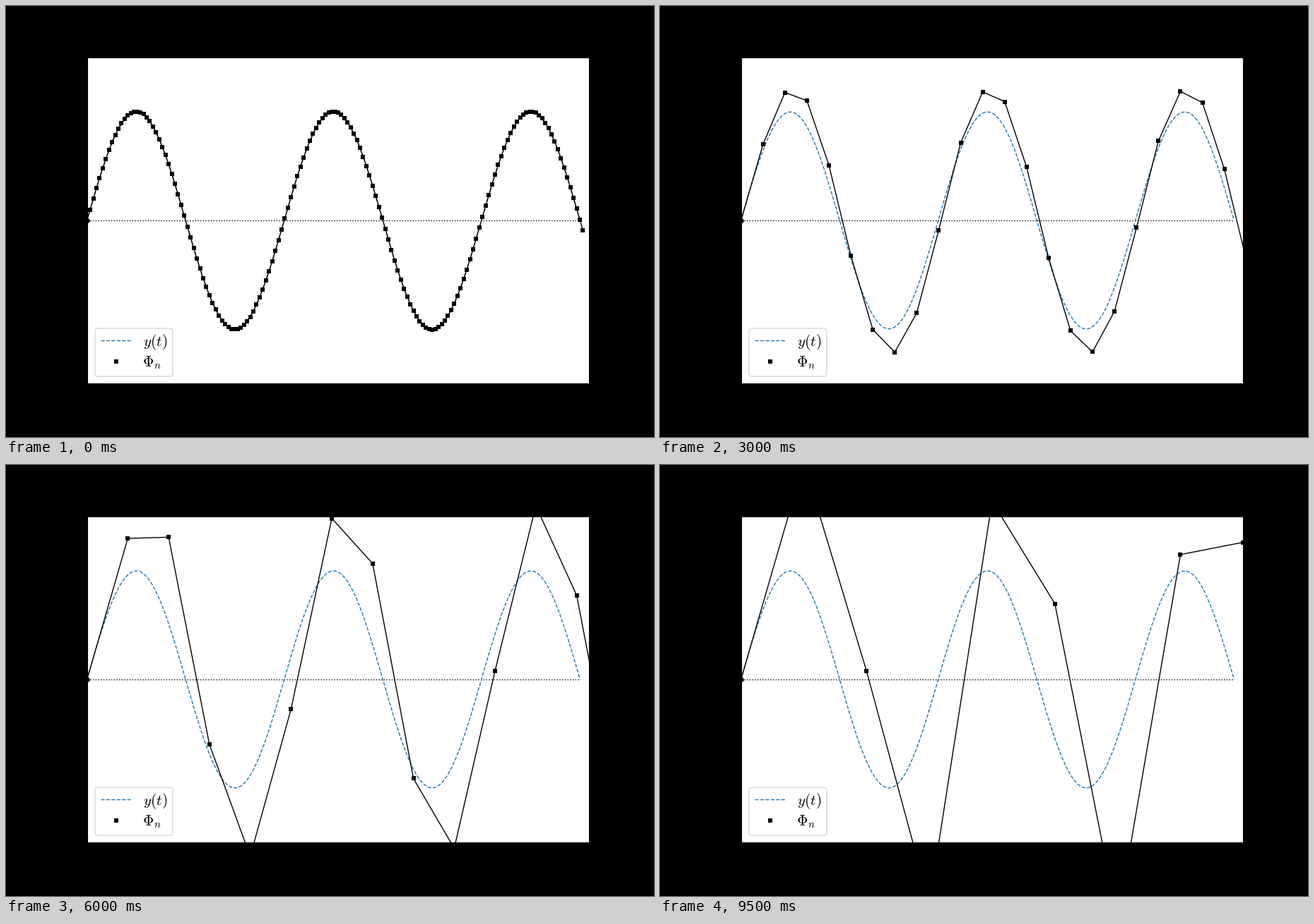
Recreate the animation shown at these times as a matplotlib script. Size 917 by 611 pixels, loop 10 s.

```python
import numpy as np
import matplotlib.pyplot as plt
from matplotlib.animation import FuncAnimation
from matplotlib.lines import Line2D
from matplotlib.patches import FancyBboxPatch

WIDTH, HEIGHT, DPI = 917, 611, 100
PX = 72 / DPI  # points per pixel
FRAMES, INTERVAL = 20, 500
T_END = 5 * np.pi
LINE = 1.4 * PX
BLUE = "#1f77b4"

plt.rcParams["mathtext.fontset"] = "cm"

fig = plt.figure(figsize=(WIDTH / DPI, HEIGHT / DPI), dpi=DPI, facecolor="black")
ax = fig.add_axes([0.125, 0.125, 0.775, 0.755])
ax.set(xlim=(0, 16), ylim=(-1.5, 1.5), xticks=[], yticks=[])

t = np.linspace(0, T_END, 600)
ax.plot([0, T_END], [0, 0], "k:", lw=LINE)
ax.plot(t, np.sin(t), "--", color=BLUE, lw=LINE)
ax.plot(0, 0, "ko", ms=6.6 * PX, mew=0, clip_on=False)
path, = ax.plot([], [], "k-", lw=LINE)
square = dict(color="black", marker="s", ms=6 * PX, mew=0, ls="none")
points, = ax.plot([], [], **square)


def add_overlay(artist):
    """Add an artist placed in pixels, measured from the top left."""
    artist.set_zorder(5)
    fig.add_artist(artist)


def pixel_line(xs, y, **style):
    add_overlay(Line2D(xs, [HEIGHT - y] * len(xs), transform=None, **style))


def pixel_text(x, baseline, label):
    fig.text(x / WIDTH, 1 - baseline / HEIGHT, label, fontsize=21.2 * PX,
             va="baseline", ha="left", zorder=6)


def draw_legend():
    add_overlay(FancyBboxPatch(
        (126, HEIGHT - 525), 110, 68, transform=None,
        boxstyle="round,pad=0,rounding_size=4.2",
        fc="white", ec="0.8", lw=LINE, alpha=0.8))
    pixel_line([134.3, 176.7], 473.7, color=BLUE, ls="--", lw=LINE)
    pixel_line([155.6], 504.4, **square)
    pixel_text(193.8, 481.8, "$y(t)$")
    pixel_text(193.3, 511.3, r"$\Phi_n$")


def update(frame):
    h = 0.1 * (frame + 1)
    start = np.arange(0, T_END, h)
    # One Euler step taken from the exact solution at each node.
    x = start + h
    y = np.sin(start) + h * np.cos(start)
    path.set_data(np.append(0, x), np.append(0, y))
    points.set_data(x, y)
    return path, points


draw_legend()
anim = FuncAnimation(fig, update, frames=FRAMES, interval=INTERVAL,
                     repeat=True, repeat_delay=0, blit=False)
plt.show()
```
